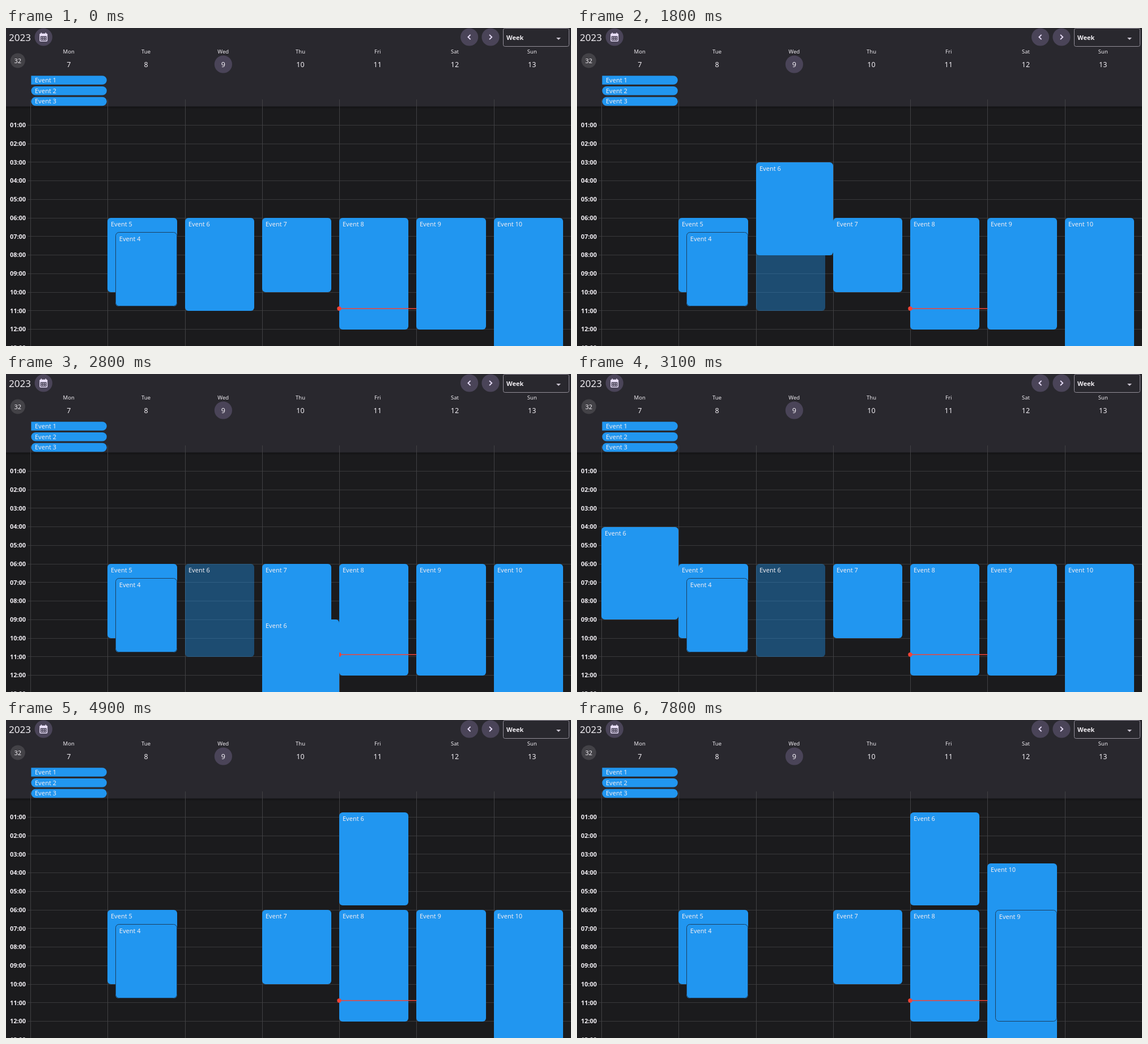
These frames come from a looping animation (997 by 561 pixels, 8.5 s). An HTML page with a canvas:

```html
<!DOCTYPE html>
<html lang="en">
<head>
<meta charset="utf-8">
<title>Week planner</title>
<style>
  html, body { margin: 0; width: 100%; height: 100%; overflow: hidden; background: #1b1b1d; }
  canvas { display: block; width: 997px; height: 561px; }
</style>
</head>
<body>
<canvas></canvas>
<script>
const W = 997, H = 561, LOOP = 8500, STEP = 100;
const LEFT = 43.2, COL = (W - LEFT) / 7;
const TOP = 138.5, HOUR = 32.75;
const BLUE = '#2196f0', TEXT = '#f0edf2', BUTTON = '#4a4458', ICON = '#e8def8';
const FONT = '"Noto Sans", "Open Sans", sans-serif';

const canvas = document.querySelector('canvas');
const scale = window.devicePixelRatio || 1;
canvas.width = W * scale;
canvas.height = H * scale;
const ctx = canvas.getContext('2d');
ctx.scale(scale, scale);

const colX = day => LEFT + day * COL;
const hourY = hour => TOP + hour * HOUR;
const clamp = (v, lo, hi) => Math.min(hi, Math.max(lo, v));

// Pointer paths through a few points; the card snaps to days and quarter hours.
const point = (t, day, hour) => ({ t, day, hour });
const loopPath = [
  point(1200, 2, 6), point(1600, 2, 3.25), point(1800, 2, 3),
  point(2100, 4, 0.25), point(2400, 6, 4), point(2700, 4, 9.5),
  point(3100, 0, 4), point(3400, 0, 0), point(3800, 4, 0.75)
];
const shortPath = [point(5800, 6, 6), point(5900, 6, 6), point(6300, 5, 3.5)];

const events = [
  { name: 'Event 5', day: 1, start: 6, hours: 4 },
  { name: 'Event 4', day: 1, start: 6.75, hours: 4, nestedFrom: 0 },
  { name: 'Event 6', day: 2, start: 6, hours: 5, path: loopPath, drop: 4900 },
  { name: 'Event 7', day: 3, start: 6, hours: 4 },
  { name: 'Event 8', day: 4, start: 6, hours: 6 },
  { name: 'Event 10', day: 6, start: 6, hours: 10, path: shortPath, drop: 6800 },
  { name: 'Event 9', day: 5, start: 6, hours: 6, nestedFrom: 6800 }
];

// Smooth curve through the path's points (cubic Hermite).
function along(path, key, t) {
  const last = path.length - 1;
  const i = clamp(path.findIndex(p => p.t > t) - 1, 0, last - 1);
  const a = path[i], b = path[i + 1], span = b.t - a.t;
  const slope = k => {
    const p = path[Math.max(k - 1, 0)], n = path[Math.min(k + 1, last)];
    return (n[key] - p[key]) / (n.t - p.t) * span;
  };
  const u = (t - a.t) / span, v = 1 - u;
  return a[key] * v * v * (1 + 2 * u) + b[key] * u * u * (3 - 2 * u) +
    slope(i) * u * v * v - slope(i + 1) * u * u * v;
}

function snapped(path, time) {
  const end = path[path.length - 1];
  const t = Math.floor(time / STEP) * STEP;
  if (t >= end.t) return end;
  return {
    day: clamp(Math.round(along(path, 'day', t)), 0, 6),
    hour: Math.max(0, Math.round(along(path, 'hour', t) * 4) / 4)
  };
}

function text(str, x, midY, size = 11, { align = 'left', weight = 500 } = {}) {
  ctx.font = `${weight} ${size}px ${FONT}`;
  ctx.textAlign = align;
  ctx.fillStyle = TEXT;
  ctx.fillText(str, x, midY + size * 0.357);
}

function disc(x, y, r, color) {
  ctx.fillStyle = color;
  ctx.beginPath();
  ctx.arc(x, y, r, 0, Math.PI * 2);
  ctx.fill();
}

function box(x, y, w, h, radius, color) {
  ctx.fillStyle = color;
  ctx.beginPath();
  ctx.roundRect(x, y, w, h, radius);
  ctx.fill();
}

function outline(x, y, w, h, radius, color) {
  ctx.strokeStyle = color;
  ctx.lineWidth = 1;
  ctx.beginPath();
  ctx.roundRect(x + 0.5, y + 0.5, w - 1, h - 1, radius);
  ctx.stroke();
}

function chevron(x, dir) {
  disc(x, 16, 15.6, BUTTON);
  ctx.strokeStyle = ICON;
  ctx.lineWidth = 1.9;
  ctx.beginPath();
  ctx.moveTo(x - dir * 2, 11.8);
  ctx.lineTo(x + dir * 2.2, 16);
  ctx.lineTo(x - dir * 2, 20.2);
  ctx.stroke();
}

function calendarButton(x, y) {
  disc(x, y, 15.6, BUTTON);
  box(x - 7, y - 6.3, 14, 14, 1.6, ICON);
  for (const side of [-1, 1]) box(x + side * 3.9 - 0.8, y - 7.8, 1.6, 2, 0, ICON);
  box(x - 5.4, y - 1.6, 10.8, 7.8, 0, BUTTON);
  for (let i = 0; i < 6; i++) {
    box(x - 3.9 + (i % 3) * 3.1, y + (i < 3 ? 0 : 3.1), 1.6, 1.6, 0, ICON);
  }
}

function drawGrid() {
  ctx.fillStyle = '#1b1b1d';
  ctx.fillRect(0, 0, W, H);
  for (let h = 1; h <= 13; h++) {
    ctx.fillStyle = '#39393b';
    ctx.fillRect(38, Math.round(hourY(h) - 0.5), W - 38, 1);
    const label = String(h).padStart(2, '0') + ':00';
    text(label, 35, hourY(h), 10.9, { align: 'right', weight: 600 });
  }
}

function drawHeader() {
  const shade = ctx.createLinearGradient(0, 138, 0, 143);
  shade.addColorStop(0, 'rgba(0,0,0,.4)');
  shade.addColorStop(1, 'rgba(0,0,0,0)');
  ctx.fillStyle = shade;
  ctx.fillRect(0, 138, W, 5);
  ctx.fillStyle = '#29282e';
  ctx.fillRect(0, 0, W, TOP);
  ctx.fillStyle = '#414144';
  for (let d = 0; d < 7; d++) ctx.fillRect(Math.round(colX(d)), 126, 1, H - 126);

  text('2023', 5, 16.5, 17);
  calendarButton(66.2, 16);
  chevron(817.6, -1);
  chevron(855, 1);

  outline(877, 0, 117, 33, 3, '#938f99');
  text('Week', 883, 17, 11, { weight: 600 });
  ctx.fillStyle = '#cac4d0';
  ctx.beginPath();
  ctx.moveTo(971, 17);
  ctx.lineTo(979, 17);
  ctx.lineTo(975, 21);
  ctx.fill();

  disc(20.8, 57.5, 13, '#434247');
  text('32', 20.8, 57.7, 11, { align: 'center' });
  disc(383.4, 64, 15.6, BUTTON);
  ['Mon', 'Tue', 'Wed', 'Thu', 'Fri', 'Sat', 'Sun'].forEach((name, d) => {
    const x = colX(d) + COL / 2 - 0.6;
    text(name, x, 42, 9.5, { align: 'center' });
    text(7 + d, x, 64.2, 12.5, { align: 'center' });
  });

  for (let i = 0; i < 3; i++) {
    const y = 84.3 + i * 18.7;
    box(44.4, y, 133.4, 15.5, i ? 7.7 : [0, 7.7, 7.7, 0], BLUE);
    text('Event ' + (i + 1), 51, y + 7.7);
  }
}

function drawEvent(e, day, hour, { wide = false, ghost = false, nested = false } = {}) {
  const x = Math.round(colX(day + (nested ? 0.1 : 0)));
  const y = Math.round(hourY(hour));
  const w = Math.round(colX(day + (wide ? 1 : 0.9)) - 0.4) - x;
  const h = Math.round(hourY(hour + e.hours)) - y;
  box(x, y, w, h, 6, ghost ? 'rgba(33,150,240,.4)' : BLUE);
  if (nested) outline(x, y, w, h, 6, '#1c3f60');
  const pad = nested ? 0.8 : 0;
  text(e.name, x + 6 + pad, y + 11 + pad);
}

function drawNow() {
  const x = colX(4), y = 495;
  box(x, y - 0.8, COL, 1.6, 0, '#f44336');
  disc(x - 0.3, y, 3.7, '#f44336');
}

function draw(t) {
  drawGrid();
  drawHeader();
  let lifted = null;
  for (const e of events) {
    if (!e.path || t < e.path[0].t) {
      drawEvent(e, e.day, e.start, { nested: t >= e.nestedFrom });
      continue;
    }
    const { day, hour } = snapped(e.path, t);
    if (t >= e.drop) {
      drawEvent(e, day, hour);
    } else {
      drawEvent(e, e.day, e.start, { ghost: true });
      lifted = [e, day, hour, { wide: true }];
    }
  }
  drawNow();
  if (lifted) drawEvent(...lifted);
}

const began = performance.now();
function tick() {
  draw((performance.now() - began) % LOOP);
  requestAnimationFrame(tick);
}
tick();
</script>
</body>
</html>
```
